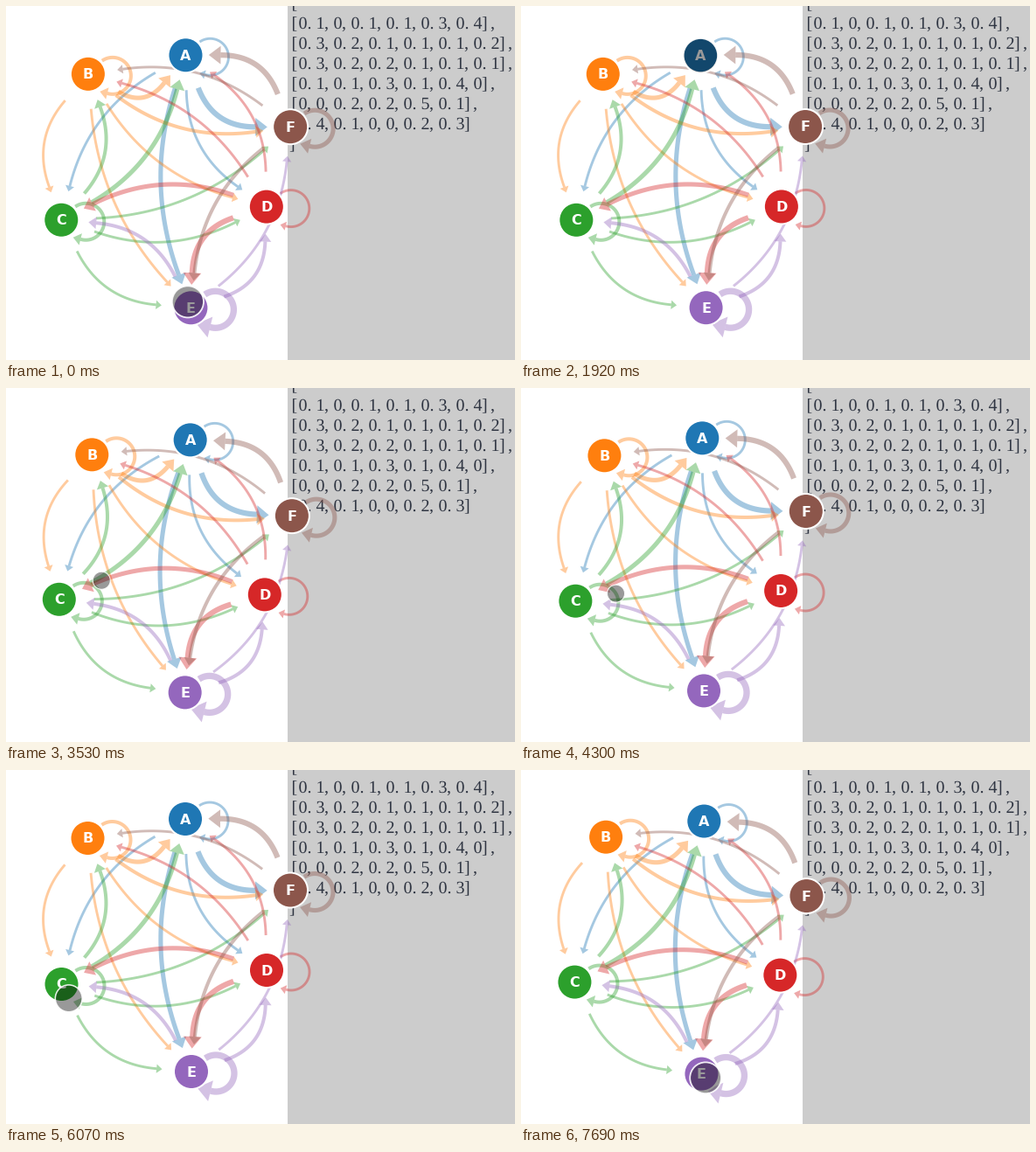
Recreate the animation shown at these times as a matplotlib script. Size 582x405 px, loop 7770 ms.

```python
import numpy as np
import matplotlib.pyplot as plt
from matplotlib.animation import FuncAnimation
from matplotlib.patches import Circle, PathPatch, Polygon, Rectangle
from matplotlib.path import Path
from matplotlib.textpath import TextPath
from matplotlib.transforms import Affine2D

W, H, DPI = 582, 405, 96
PX = 72 / DPI                     # points per pixel
FRAMES, STEP = 259, 30            # 7770 ms loop

NAMES = "ABCDEF"
COLORS = ["#1f77b4", "#ff7f0e", "#2ca02c", "#d62728", "#9467bd", "#8c564b"]
TEXT = """[
[0.1,0,0.1,0.1,0.3,0.4],
[0.3,0.2,0.1,0.1,0.1,0.2],
[0.3,0.2,0.2,0.1,0.1,0.1],
[0.1,0.1,0.3,0.1,0.4,0],
[0,0,0.2,0.2,0.5,0.1],
[0.4,0.1,0,0,0.2,0.3]
]""".split("\n")
MATRIX = [[float(p) for p in row.strip("[],").split(",")] for row in TEXT[1:-1]]

HOME = np.array([(205, 56), (93.5, 78), (63.5, 245),
                 (298, 229), (212, 345), (325, 137.5)])
HUB = np.array([200, 182])
SWAYS = [(840, 0.25), (3530, 1), (8100, 1)]   # time and strength

# Walk of the marker through the states
WALK = "ECADCCCEE"
HOP, FIRST = 1002, -145           # ms per hop, start of the first hop
LEAVE, ARRIVE = 0.25, 0.68        # phases of a hop

RADIUS, GAP, BEND = 20, 40, 50
U = np.linspace(0, 1, 41)


def layout(t):
    """The graph sways: it turns slightly about its hub and sinks."""
    s = sum(a * np.exp(-((t - c) / 800) ** 2) for c, a in SWAYS)
    x, y = (HOME - HUB).T
    cos, sin = np.cos(0.045 * s), np.sin(0.045 * s)
    turned = np.column_stack([x * cos - y * sin, x * sin + y * cos])
    return HUB + turned + [0, 3 * s]


def unit(v):
    return v / np.hypot(*v)


def link_path(pos, i, j, u=U):
    """Points along the link from state i to state j."""
    u = np.atleast_1d(u)[:, None]
    p, q = pos[i], pos[j]
    if i == j:
        a = np.radians(-125 + 231.6 * u)
        return p + [28, 2] + 21 * np.hstack([np.cos(a), np.sin(a)])
    d = unit(q - p)
    mid = (p + q) / 2 + BEND * np.array([-d[1], d[0]])
    start = p + GAP * unit(mid - p)
    end = q + GAP * unit(mid - q)
    return (1 - u) ** 2 * start + 2 * u * (1 - u) * mid + u ** 2 * end


def arrow_head(path, width):
    d = unit(path[-1] - path[-2])
    side = np.array([-d[1], d[0]]) * (1.6 * width + 0.5)
    end = path[-1]
    return [end + side, end + d * 2.2 * width, end - side]


def marker_state(t, pos):
    """Centre and scale of the marker."""
    k, u = divmod((t - FIRST) / HOP, 1)
    i, j = (NAMES.index(c) for c in WALK[int(k):int(k) + 2])
    if u < LEAVE:
        e = (u / LEAVE) ** 3
        return pos[i] + e * (link_path(pos, i, j, 0)[0] - pos[i]), 1 - e / 2
    if u < ARRIVE:
        return link_path(pos, i, j, (u - LEAVE) / (ARRIVE - LEAVE))[0], 0.5
    e = 1 - (1 - (u - ARRIVE) / (1 - ARRIVE)) ** 3
    end = link_path(pos, i, j, 1)[0]
    return end + e * (pos[j] - end), 0.5 + e / 2


def grid_text(lines, x, y, advance, leading, size, family):
    """Outline of text set on a fixed character grid."""
    nudge = {"[": 2, "]": -0.5, ",": -0.5}
    glyphs = []
    for n, line in enumerate(lines):
        for c, ch in enumerate(line):
            place = Affine2D().scale(1, -1).translate(
                x + advance * c + nudge.get(ch, 0), y + leading * n)
            glyph = TextPath((0, 0), ch, size=size, prop={"family": family})
            glyphs.append(place.transform_path(glyph))
    return Path.make_compound_path(*glyphs)


fig = plt.figure(figsize=(W / DPI, H / DPI), dpi=DPI, facecolor="white")
ax = fig.add_axes([0, 0, 1, 1])
ax.set(xlim=(0, W), ylim=(H, 0))
ax.axis("off")

ax.add_patch(Rectangle((322, 0), W - 322, H, fc="#cccccc", lw=0, zorder=0))
ax.add_patch(PathPatch(grid_text(TEXT, 324.5, 3, 10, 23, 20, "Liberation Serif"),
                       fc="#2f3542", lw=0, zorder=1))

links = []
for i, row in enumerate(MATRIX):
    for j, prob in enumerate(row):
        if prob:
            width = 1.8 + 11 * prob
            line, = ax.plot([], [], color=COLORS[i], alpha=0.4, lw=width * PX,
                            solid_capstyle="butt", zorder=2)
            head = ax.add_patch(Polygon(np.zeros((3, 2)), fc=COLORS[i],
                                        alpha=0.4, lw=0, zorder=2))
            links.append((i, j, width, line, head))

nodes = []
for name, color in zip(NAMES, COLORS):
    disc = ax.add_patch(Circle((0, 0), RADIUS, fc=color, ec="white",
                               lw=2 * PX, zorder=3))
    label = ax.text(0, 0, name, family="DejaVu Sans", weight="bold",
                    size=16 * PX, color="white", ha="center",
                    va="baseline", zorder=4)
    nodes.append((disc, label))

marker = ax.add_patch(Circle((0, 0), RADIUS, fc=(0, 0, 0, 0.4),
                             ec=(1, 1, 1, 0.9), zorder=5))


def update(frame):
    t = frame * STEP
    pos = layout(t)
    for i, j, width, line, head in links:
        path = link_path(pos, i, j)
        line.set_data(path[:, 0], path[:, 1])
        head.set_xy(arrow_head(path, width))
    for (disc, label), (x, y) in zip(nodes, pos):
        disc.center = x, y
        label.set_position((x, y + 5.5))
    centre, scale = marker_state(t, pos)
    marker.center = tuple(centre)
    marker.set_radius(RADIUS * scale)
    marker.set_linewidth(2 * scale * PX)
    return []


anim = FuncAnimation(fig, update, frames=FRAMES, interval=STEP,
                     repeat=True, repeat_delay=0, blit=False)
plt.show()
```
